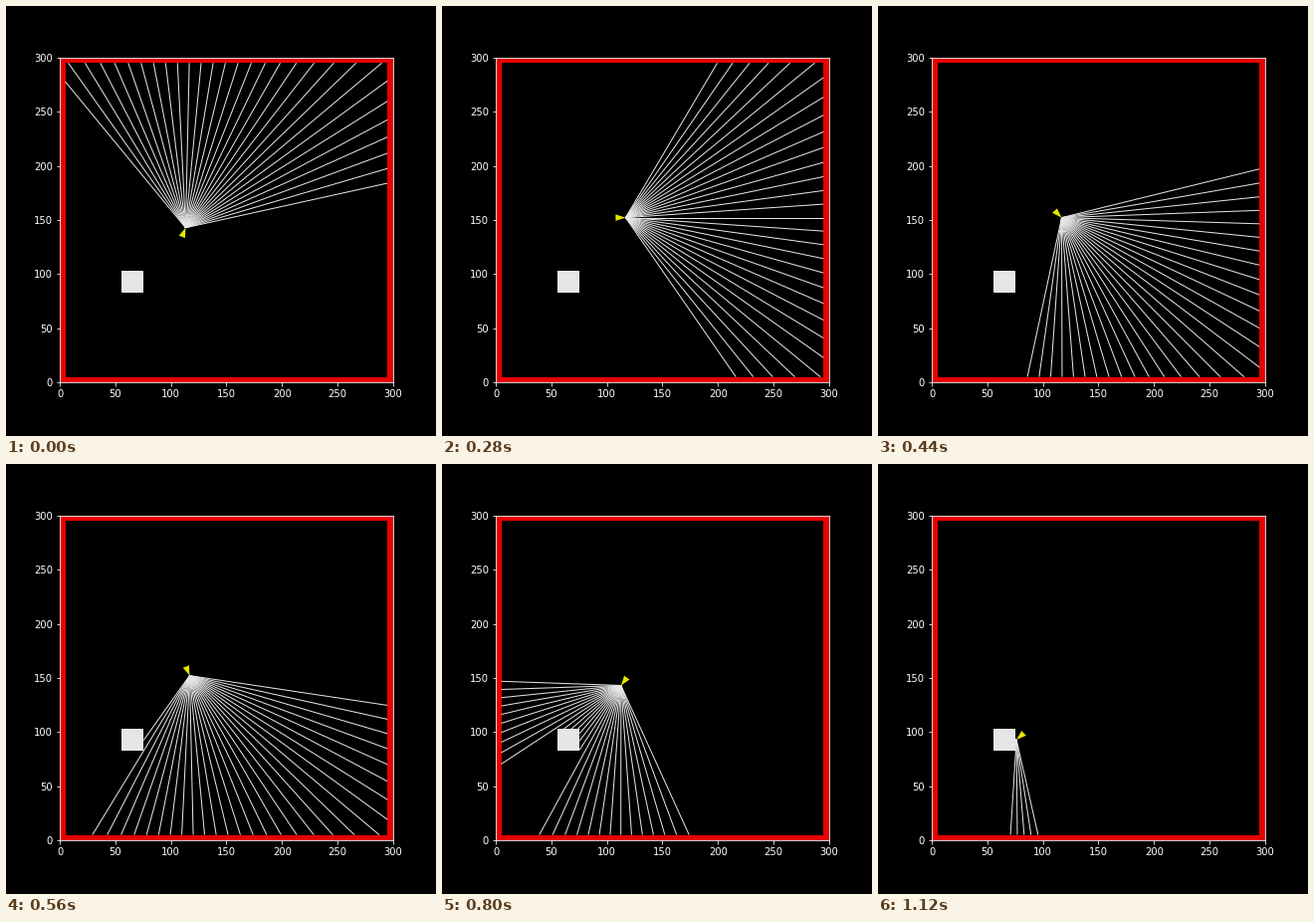
A matplotlib script that plays this animation: 432x432 px, repeating every 1.16 s.

```python
import numpy as np
import matplotlib.pyplot as plt
from matplotlib.animation import FuncAnimation
from matplotlib.collections import LineCollection
from matplotlib.patches import Polygon, Rectangle

SIZE, WALL = 300, 5
ROOM = np.array([[WALL, WALL], [SIZE - WALL, SIZE - WALL]])
BLOCK = np.array([[55.5, 83], [75.5, 103]])
START, HEADING = np.array([113.3, 142.8]), 1.2
STEP, TURN, MARGIN = 10, 0.2, 1.3
FAN = np.radians(np.arange(-56, 61, 4))
LIGHT, RED, YELLOW = (0.9, 0.9, 0.9), (0.9, 0, 0), (0.9, 0.9, 0)

# F = forward, R = turn right, . = wait
MOVES = "." + "F" + "R" * 10 + "." + "R" * 6 + "F" + "R" + "F" * 7 + "R"


def unit(angle):
    return np.array([np.cos(angle), np.sin(angle)])


def cast(pos, angle):
    """Distance from pos to the first obstacle along angle."""
    d = unit(angle) + 1e-12
    room = ((ROOM - pos) / d).max(axis=0).min()
    t = (BLOCK - pos) / d
    near, far = t.min(axis=0).max(), t.max(axis=0).min()
    return min(room, near) if 0 < near < far else room


def walk():
    pos, heading = START, HEADING
    for move in MOVES:
        if move == "F":
            step = min(STEP, cast(pos, heading) - MARGIN)
            pos = pos + step * unit(heading)
        elif move == "R":
            heading -= TURN
        yield pos, heading


def arrow(pos, heading):
    back = pos - 9 * unit(heading)
    side = 3 * unit(heading + np.pi / 2)
    return [pos, back + side, back - side]


plt.style.use("dark_background")
plt.rcParams["font.family"] = "DejaVu Sans"
fig, ax = plt.subplots(figsize=(6, 6), dpi=72)
fig.subplots_adjust(left=0.125, right=0.9, bottom=0.125, top=0.88)
ax.set(xlim=(0, SIZE), ylim=(0, SIZE))
ticks = range(0, SIZE + 1, 50)
ax.set_xticks(ticks)
ax.set_yticks(ticks)

for x, y, w, h in [(0, 0, WALL, SIZE), (SIZE - WALL, 0, WALL, SIZE),
                   (0, 0, SIZE, WALL), (0, SIZE - WALL, SIZE, WALL)]:
    ax.add_patch(Rectangle((x, y), w, h, fc=RED, lw=0))
ax.add_patch(Rectangle(BLOCK[0], *(BLOCK[1] - BLOCK[0]), fc=LIGHT, lw=0))

rays = ax.add_collection(LineCollection([], colors=[LIGHT], linewidths=1),
                         autolim=False)
agent = ax.add_patch(Polygon(arrow(START, HEADING), fc=YELLOW, lw=0, zorder=2.2))
poses = list(walk())


def update(i):
    pos, heading = poses[i]
    rays.set_segments([[pos, pos + cast(pos, a) * unit(a)]
                       for a in heading + FAN])
    agent.set_xy(arrow(pos, heading))
    return rays, agent


anim = FuncAnimation(fig, update, frames=len(poses), interval=40,
                     repeat=True, repeat_delay=0)
plt.show()
```
